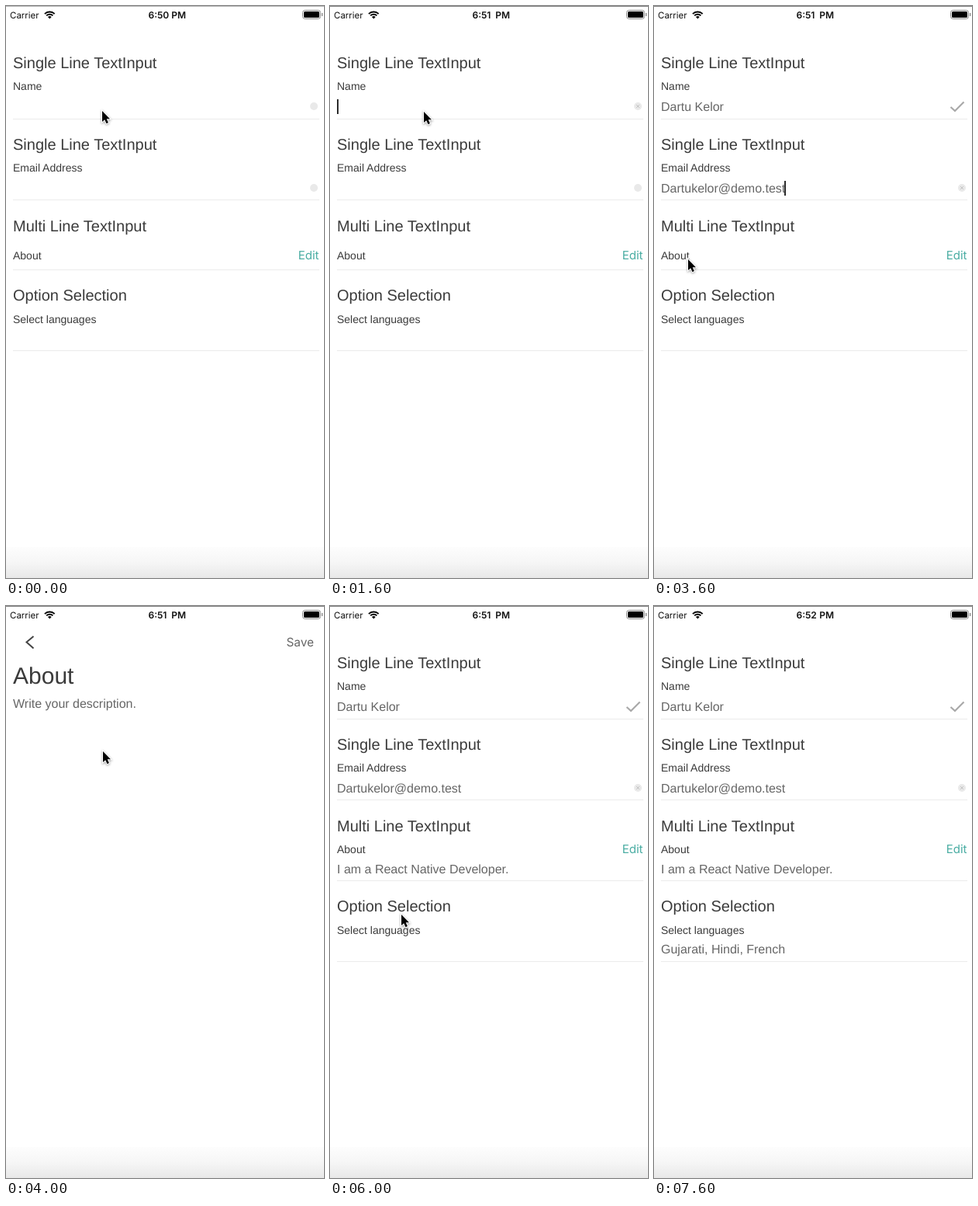
Recreate the animation shown at these times as an HTML page with a canvas. Size 410x736 px, loop 8000 ms.

```html
<!DOCTYPE html>
<html lang="en">
<head>
<meta charset="utf-8">
<title>Text input form</title>
<style>
  html, body { margin: 0; width: 100%; height: 100%; overflow: hidden; background: #fff; }
  canvas { display: block; }
</style>
</head>
<body>
<canvas id="stage" width="410" height="736"></canvas>
<script>
const ctx = document.getElementById('stage').getContext('2d');
ctx.textRendering = 'geometricPrecision';
const STEP = 400;
const SANS = '"Liberation Sans", Arial, sans-serif';
const UI = 'Inter, Roboto, sans-serif';
const INK = '#3b3b3b', GREY = '#666', LINE = '#ebebeb', TEAL = '#4aada3';

const PERSON = 'Dartu Kelor';
const EMAIL = 'Dartukelor@demo.test';
const BIO = 'I am a React Native Developer.';
const LANGUAGES = ['Gujarati', 'English', 'Hindi', 'French', 'German'];

// Every entry changes the state left by the one before it.
const steps = [
  { page: 'form', clock: '6:50', name: '', email: '', about: '', options: '',
    nameIcon: 'dot', emailIcon: 'dot', caret: '', cursor: [124, 135], picked: [] },
  { nameIcon: 'clear', caret: 'name', cursor: [121, 136] },
  { name: PERSON.slice(0, -1) },
  { clock: '6:51', name: PERSON, nameIcon: 'tick', emailIcon: 'clear', caret: 'email', cursor: [146, 233] },
  { name: '', nameIcon: 'clear', emailIcon: 'dot', caret: 'name', cursor: [121, 136] },
  { name: PERSON.slice(0, -1) },
  { name: PERSON, nameIcon: 'tick', email: EMAIL.slice(0, 4), emailIcon: 'clear', caret: 'email', cursor: [146, 233] },
  { email: EMAIL.slice(0, 10), caret: '' },
  { email: EMAIL.slice(0, 15), caret: 'email' },
  { email: EMAIL, cursor: [44, 326] },
  { page: 'about', caret: '', cursor: [125, 187] },
  { about: BIO.slice(0, 5), caret: 'about' },
  { about: BIO.slice(0, 13) },
  { about: BIO.slice(0, 27) },
  { page: 'form', about: BIO, caret: 'email', cursor: [125, 360] },
  { caret: '', cursor: [92, 397] },
  { page: 'languages', picked: [0, 2], cursor: [375, 258] },
  { picked: [0, 2, 3], cursor: [375, 69] },
  { page: 'form', options: 'Gujarati, Hindi, French', nameIcon: 'clear', emailIcon: 'tick',
    caret: 'name', cursor: [147, 131] },
  { clock: '6:52', nameIcon: 'tick', emailIcon: 'clear', caret: '', cursor: null }
];
const states = [];
steps.forEach((step, i) => states.push({ ...states[i - 1], ...step }));

function text(str, x, y, size, color = INK, align = 'left', font = SANS, weight = 400) {
  ctx.font = `${weight} ${size}px ${font}`;
  ctx.fillStyle = color;
  ctx.textAlign = align;
  ctx.fillText(str, x, y);
}

function stroke(points, color, width) {
  ctx.beginPath();
  points.forEach(([x, y]) => ctx.lineTo(x, y));
  ctx.strokeStyle = color;
  ctx.lineWidth = width;
  ctx.stroke();
}

function rule(x, y, right) {
  ctx.fillStyle = LINE;
  ctx.fillRect(x, y, right - x, 1);
}

function value(str, y, focused) {
  text(str, 9, y, 16, GREY);
  if (!focused) return;
  const x = Math.max(9, Math.round(8 + ctx.measureText(str).width));
  ctx.fillStyle = '#2b2b2b';
  ctx.fillRect(x, y - 15, 2, 19);
}

function statusBar(clock) {
  text('Carrier', 5, 16, 11.5, '#111', 'left', UI);
  text(clock, 183.5, 16, 12, '#111', 'left', UI, 600);
  text('PM', 232, 16, 12, '#111', 'right', UI, 600);

  ctx.strokeStyle = ctx.fillStyle = '#000';
  ctx.lineCap = 'butt';
  ctx.lineWidth = 2;
  for (const r of [9, 5.8]) {
    ctx.beginPath();
    ctx.arc(56.3, 16.5, r, -Math.PI * 0.75, -Math.PI * 0.25);
    ctx.stroke();
  }
  ctx.beginPath();
  ctx.moveTo(56.3, 16.5);
  ctx.arc(56.3, 16.5, 3.4, -Math.PI * 0.75, -Math.PI * 0.25);
  ctx.fill();

  ctx.strokeStyle = '#888';
  ctx.lineWidth = 1;
  ctx.beginPath();
  ctx.roundRect(382.5, 5.5, 23, 11, 3);
  ctx.stroke();
  ctx.beginPath();
  ctx.roundRect(384, 7, 20, 8, 1.5);
  ctx.fill();
  ctx.fillStyle = '#888';
  ctx.fillRect(407, 9, 1.3, 4);
}

function fieldIcon(kind, y) {
  if (kind === 'tick') {
    ctx.lineCap = 'butt';
    stroke([[382.5, y + 1], [388, y + 6], [399.5, y - 5.5]], '#a9a9a9', 2.2);
    return;
  }
  ctx.fillStyle = '#e9e9e9';
  ctx.beginPath();
  ctx.arc(397, y, 5, 0, Math.PI * 2);
  ctx.fill();
  if (kind === 'clear') {
    stroke([[395, y - 2], [399, y + 2]], '#c4c4c4', 1);
    stroke([[399, y - 2], [395, y + 2]], '#c4c4c4', 1);
  }
}

function formPage(s) {
  text('Single Line TextInput', 9, 80, 20);
  text('Name', 9, 108, 14);
  value(s.name, 135, s.caret === 'name');
  fieldIcon(s.nameIcon, 129);
  rule(9, 145, 404);

  text('Single Line TextInput', 9, 185, 20);
  text('Email Address', 9, 213, 14);
  value(s.email, 240, s.caret === 'email');
  fieldIcon(s.emailIcon, 234);
  rule(9, 249, 404);

  const filled = s.about !== '';
  const labelY = filled ? 318 : 326;
  const shift = filled ? 14 : 0;
  text('Multi Line TextInput', 9, 290, 20);
  text('About', 9, labelY, 14);
  text('Edit', 403.5, labelY, 15, TEAL, 'right', UI);
  value(s.about, 344, false);
  rule(9, 339 + shift, 404);

  text('Option Selection', 9, 379 + shift, 20);
  text('Select languages', 9, 408 + shift, 14);
  value(s.options, 447, false);
  rule(9, 443 + shift, 404);
}

function navBar(backX, saveX) {
  ctx.lineCap = 'butt';
  stroke([[backX + 9, 39], [backX, 46.5], [backX + 9, 54.5]], '#444', 2);
  text('Save', saveX, 52, 15.4, GREY, 'right', UI);
}

function aboutPage(s) {
  navBar(26.5, 397);
  text('About', 9, 100, 30);
  text('Write your description.', 9, 131, 16, GREY);
  value(s.about, 174, s.caret === 'about');
}

function checkbox(y, checked) {
  if (!checked) {
    ctx.strokeStyle = '#c6c6c6';
    ctx.lineWidth = 2;
    ctx.beginPath();
    ctx.roundRect(372, y - 9, 18, 18, 2);
    ctx.stroke();
    return;
  }
  ctx.lineCap = ctx.lineJoin = 'round';
  stroke([[376.5, y - 1.5], [380.5, y + 2.5], [390.5, y - 8]], TEAL, 2);
  ctx.beginPath();
  ctx.moveTo(389, y);
  ctx.arcTo(389, y + 9, 371, y + 9, 2);
  ctx.arcTo(371, y + 9, 371, y - 9, 2);
  ctx.arcTo(371, y - 9, 384, y - 9, 2);
  ctx.lineTo(384, y - 9);
  ctx.stroke();
  ctx.lineCap = 'butt';
  ctx.lineJoin = 'miter';
}

function languagesPage(s) {
  navBar(29.5, 392);
  text('Select languages', 14, 110, 30);
  LANGUAGES.forEach((language, i) => {
    const y = 161 + i * 48;
    text(language, 13.5, y + 3, 14.3, INK, 'left', UI);
    checkbox(y, s.picked.includes(i));
    if (i < LANGUAGES.length - 1) rule(14, y + 20, 398);
  });
}

function pointer([x, y]) {
  ctx.save();
  ctx.translate(x, y);
  ctx.beginPath();
  [[0, 0], [0, 14], [3.2, 11.2], [5.5, 16.2], [7.9, 15.1], [5.7, 10.3], [10, 10.3]]
    .forEach(p => ctx.lineTo(...p));
  ctx.closePath();
  ctx.shadowColor = 'rgba(0,0,0,.4)';
  ctx.shadowBlur = 3;
  ctx.shadowOffsetY = 1;
  ctx.strokeStyle = '#fff';
  ctx.lineWidth = 2;
  ctx.stroke();
  ctx.shadowColor = 'transparent';
  ctx.fillStyle = '#000';
  ctx.fill();
  ctx.restore();
}

const footer = ctx.createLinearGradient(0, 696, 0, 736);
footer.addColorStop(0, '#fdfdfd');
footer.addColorStop(0.5, '#f6f6f6');
footer.addColorStop(1, '#e8e8e8');

const pages = { form: formPage, about: aboutPage, languages: languagesPage };

function draw(index) {
  const s = states[index];
  ctx.fillStyle = '#fff';
  ctx.fillRect(0, 0, 410, 736);
  ctx.fillStyle = footer;
  ctx.fillRect(0, 696, 410, 40);
  ctx.fillStyle = index ? '#808080' : '#b4b4b4';
  ctx.fillRect(0, 0, 410, 1);
  statusBar(s.clock);
  pages[s.page](s);
  if (s.cursor) pointer(s.cursor);
}

const start = performance.now();
function tick() {
  const elapsed = Math.max(0, performance.now() - start);
  draw(Math.floor(elapsed / STEP) % states.length);
  requestAnimationFrame(tick);
}
tick();
</script>
</body>
</html>
```
